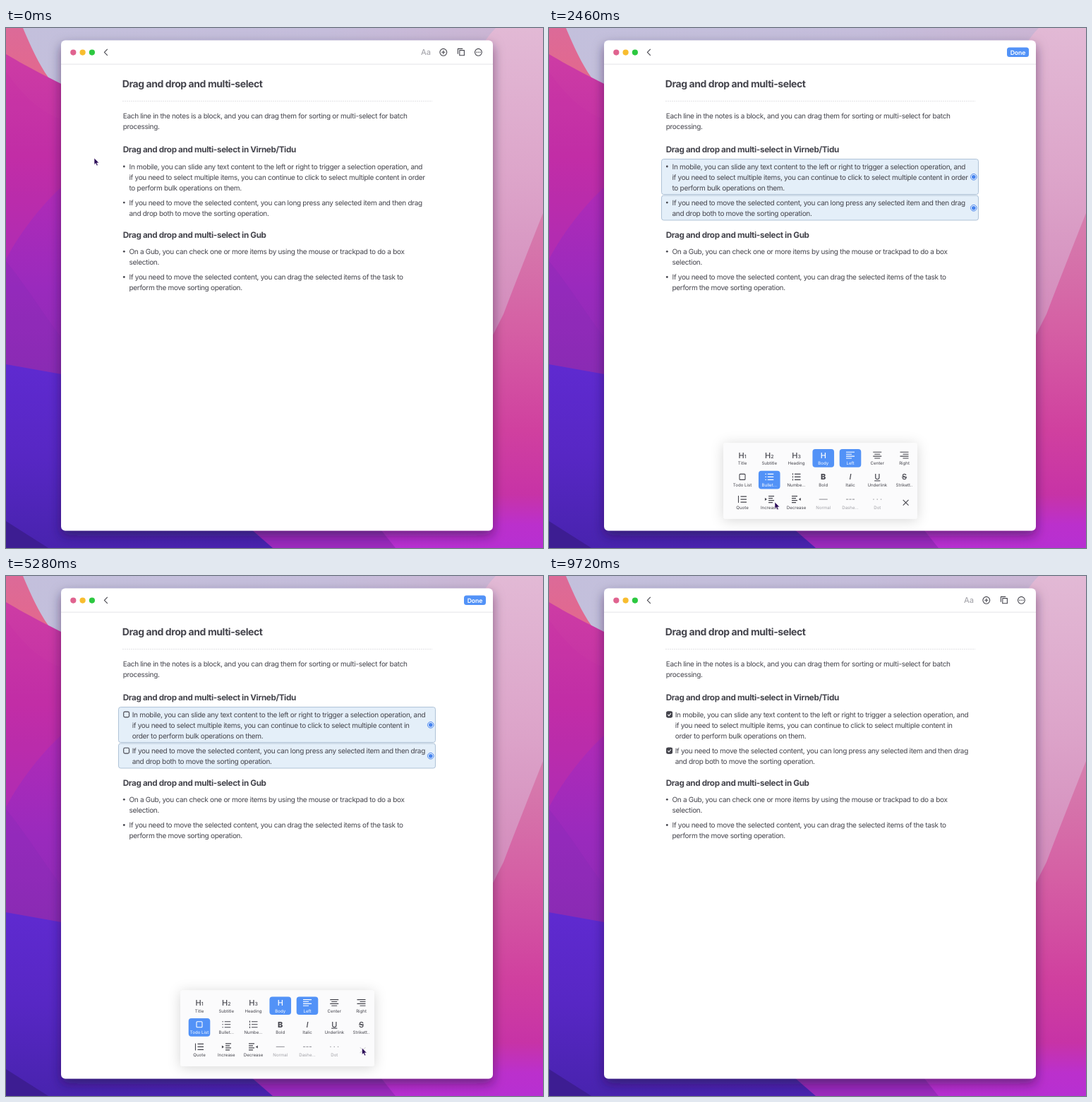
Animation of 761x736 px, one loop 9780 ms. Source, as an HTML page:

```html
<!DOCTYPE html>
<html lang="en">
<head>
<meta charset="utf-8">
<title>Drag and drop and multi-select</title>
<style>
  html, body { margin: 0; width: 100%; height: 100%; overflow: hidden; }
  svg { display: block; width: 761px; height: 736px; font-family: Inter, sans-serif; text-rendering: geometricPrecision; }
  .ink { color: #45454d; }
  .body { font-size: 10px; letter-spacing: -.03em; }
  .head { font-size: 11.7px; font-weight: 700; letter-spacing: -.03em; }
  .title { font-size: 14px; font-weight: 700; letter-spacing: -.03em; }
  .label { font-size: 6.1px; text-anchor: middle; }
  .icon { font-size: 11px; font-weight: 500; text-anchor: middle; }
  text { fill: currentColor; }
  .line { fill: none; stroke: currentColor; stroke-width: 1.1; stroke-linejoin: round; }
  .tool rect { fill: none; }
  .tool.on { color: #fff; }
  .tool.on rect { fill: #5292f7; }
</style>
</head>
<body>
<svg id="stage" viewBox="0 0 761 736"></svg>
<script>
const LOOP = 9780, BLUE = '#5292f7';

const text = (x, y, s, cls) => `<text x="${x}" y="${y}" class="${cls}">${s}</text>`;
const line = (d, extra = '') => `<path class="line" d="${d}" ${extra}/>`;
const shape = (d, fill) => `<path d="${d}" fill="${fill}"/>`;
const circle = (x, y, r, attrs) => `<circle cx="${x}" cy="${y}" r="${r}" ${attrs}/>`;
const group = (id, content) => `<g id="${id}">${content}</g>`;
const rows = (x, y, lines) => lines.map((s, i) => text(x, y + i * 15.2, s, 'body')).join('');
const bullet = (y, lines) => circle(167.3, y - 3.5, 1.4, 'fill="currentColor"') + rows(174.5, y, lines);
const fade = (id, stops, dir = 'x2="0" y2="1"') => `<linearGradient id="${id}" ${dir}>` +
  stops.map(([at, c]) => `<stop offset="${at}" stop-color="${c}"/>`).join('') + '</linearGradient>';
const shadow = (id, dy, blur, color, alpha) =>
  `<filter id="${id}" x="-30%" y="-60%" width="160%" height="240%">
   <feDropShadow dx="0" dy="${dy}" stdDeviation="${blur}" flood-color="${color}" flood-opacity="${alpha}"/></filter>`;

const defs = `<defs>
  ${fade('sky', [[0, '#c3c0dc'], [.6, '#c5bddb'], [1, '#cdb3d2']], '')}
  ${fade('coral', [[0, '#dc6a98'], [1, '#e5688a']])}
  ${fade('magenta', [[0, '#cd3ca4'], [.45, '#c22fa6'], [1, '#a92cb8']])}
  ${fade('purple', [[0, '#b12bb6'], [.5, '#9a2abd'], [1, '#8a2bb2']])}
  ${fade('indigo', [[0, '#5f2ad0'], [.5, '#5727c4'], [1, '#4823ae']])}
  ${fade('blush', [[0, '#e2b9d5'], [.4, '#dda5ca'], [1, '#cf7fb5']])}
  ${fade('rose', [[0, '#d67fae'], [.35, '#d55fa4'], [.65, '#d0409f'], [.84, '#c733a6'], [.93, '#bb30cc'], [1, '#b72fd2']])}
  ${shadow('windowShadow', 7, 8, '#1c0838', .5)}
  ${shadow('panelShadow', 2, 9, '#000', .16)}
  <clipPath id="windowClip"><rect x="78" y="17.5" width="612" height="694" rx="6"/></clipPath>
</defs>`;

const wallpaper =
  '<rect width="761" height="736" fill="url(#sky)"/>' +
  shape('M0 0H24C36 28 46 50 60 70L90 95H0Z', 'url(#coral)') +
  shape('M0 37C25 52 52 66 90 85V360H0Z', 'url(#magenta)') +
  shape('M0 62C22 92 45 120 90 134V360H0Z', '#b826a61f') +
  shape('M90 215C60 240 25 280 0 327V520H90Z', 'url(#purple)') +
  shape('M0 330C25 360 50 400 90 455V520H0Z', '#7d2ab038') +
  shape('M0 476L90 492L400 690V736H0Z', 'url(#indigo)') +
  shape('M0 698L60 736H0Z', '#3d1d92') +
  shape('M325 690L378 736H600V690Z', '#9b2abd') +
  shape('M694 0C686 8 680 16 672 30V520H761V0Z', 'url(#blush)') +
  shape('M761 262C742 310 722 360 705 405L672 470V690H515L552 736H761Z', 'url(#rose)');

const frame = `<rect x="78" y="17.5" width="612" height="694" rx="6" fill="#fff" filter="url(#windowShadow)"/>` +
  ['#e0638f', '#f8bd2f', '#2cc840'].map((c, i) => circle(95.3 + i * 13.3, 34.6, 4.1, `fill="${c}"`)).join('') +
  line('M143.8 29.8L139.4 34.3L143.8 38.8') + '<path d="M78 51.2H690" stroke="#e5e5e8"/>';

const header = group('header',
  '<g color="#a9a9af">' + text(595, 38, 'Aa', 'icon') + '</g>' +
  circle(619.8, 34.3, 4.9, 'class="line"') + line('M617.2 34.3h5.2M619.8 31.7v5.2') +
  line('M642.8 31.6h6.6v7.2h-6.6ZM640.4 36.8v-7.4h6.8') +
  circle(669.4, 34.3, 4.9, 'class="line"') +
  [-2.4, 0, 2.4].map(d => circle(669.4 + d, 34.3, .8, 'fill="currentColor"')).join(''));

const done = group('done', `<rect x="649" y="27.5" width="31" height="13.6" rx="3.5" fill="${BLUE}"/>
  <text x="664.5" y="37.5" text-anchor="middle" font-size="8.7" font-weight="600" letter-spacing="-.1" style="fill:#fff">Done</text>`);

const selection = (id, y, h) => group(id,
  `<rect x="159.5" y="${y}" width="449" height="${h}" rx="3" fill="#e4eff9" stroke="#a8bdd3" stroke-width=".9"/>` +
  circle(601.8, y + h / 2 + .2, 4.3, 'fill="#f4f9ff" stroke="#4583ee"') + circle(601.8, y + h / 2 + .2, 2.8, 'fill="#4583ee"'));

const checkbox = (id, y) => `<rect x="166.7" y="${y - 7.7}" width="7.8" height="7.8" rx="1.9" class="line"/>` +
  group(id, `<rect x="166.2" y="${y - 8.2}" width="8.8" height="8.8" rx="2.2" fill="currentColor"/>` +
  line(`M168.4 ${y - 3.7}l1.6 1.7 2.9-3.5`, 'style="stroke:#fff"'));

const mobile = 'In mobile, you can slide any text content to the left or right to trigger a selection operation, and';
const press = 'If you need to move the selected content, you can long press any selected item and then drag';
const drop = 'and drop both to move the sorting operation.';
const page =
  text(164.7, 83.8, 'Drag and drop and multi-select', 'title') +
  '<path d="M165 103.5H604" stroke="#dcdce0" stroke-width=".8" stroke-dasharray="2 1"/>' +
  rows(165.7, 127.7, ['Each line in the notes is a block, and you can drag them for sorting or multi-select for batch', 'processing.']) +
  text(165.7, 176, 'Drag and drop and multi-select in Virneb/Tidu', 'head') +
  group('bullets',
    bullet(199.5, [mobile, 'if you need to select multiple items, you can continue to click to select multiple content in order', 'to perform bulk operations on them.']) +
    bullet(250.6, [press, drop])) +
  group('todos',
    checkbox('check1', 199.8) + checkbox('check2', 251) +
    rows(178.7, 199.5, [mobile, 'if you need to select multiple items, you can continue to click to select multiple content in', 'order to perform bulk operations on them.']) +
    rows(178.7, 250.6, [press, drop])) +
  text(165.7, 296.6, 'Drag and drop and multi-select in Gub', 'head') +
  bullet(319.8, ['On a Gub, you can check one or more items by using the mouse or trackpad to do a box', 'selection.']) +
  bullet(356, ['If you need to move the selected content, you can drag the selected items of the task to', 'perform the move sorting operation.']);

const handle = group('handle', [0, 1, 2, 3].map(i =>
  [151.3, 155].map(x => circle(x, 243 + i * 2.8, .75, 'fill="#9a9aa2"')).join('')).join(''));

const card = (x, y, w, h) => `<rect x="${x}" y="${y}" width="${w}" height="${h}" rx="4" fill="#fbfbfc" filter="url(#panelShadow)"/>`;
const icon = s => `<text y="3.9" class="icon">${s}</text>`;
const heading = n => icon(`H<tspan font-size="7">${n}</tspan>`);
const tool = (name, x, y, art, label, color = '') =>
  `<g id="${name}" class="tool" transform="translate(${x} ${y})" ${color && `color="${color}"`}>
   <rect x="-15.3" y="-8.6" width="30.6" height="25.6" rx="4"/>${art}${text(0, 13.7, label, 'label')}</g>`;

const scissors = circle(-4, -2.6, 1.8, 'class="line"') + circle(-4, 2.6, 1.8, 'class="line"') + line('M-2.5-1.7L6 3M-2.5 1.7L6-3');
const toolbar = group('toolbar', card(292.5, 658, 183.5, 37.5) +
  tool('style', 322, 672, icon('Aa'), 'Style') +
  tool('copy', 363.5, 672, line('M-2-5.5h4l3 3v5.5h-7ZM-2-3h-3v8.5h7v-2.5M2-5.5v3h3'), 'Copy') +
  tool('cut', 403, 672, scissors, 'Cut') +
  tool('delete', 444.5, 672, line('M-5-3.5h10M-2-3.5v-2h4v2M-4-3.5l.5 9h7l.5-9M-1.4-1v4.5M1.4-1v4.5'), 'Delete', '#d5608f'));

const list = 'M-2.5-4h8.5M-2.5 0h8.5M-2.5 4h8.5';
const align = x => line(`M-6-4.4h12M${x}-1.5h8M-6 1.4h12M${x} 4.3h8`);
const indent = (x, arrow) => line(`M${x}-4.5h8M${x}-1.5h6M${x} 1.5h8M${x} 4.5h6`) + shape(arrow, 'currentColor');
const grid = [
  [['h1', heading(1), 'Title'], ['h2', heading(2), 'Subtitle'], ['h3', heading(3), 'Heading'], ['plain', icon('H'), 'Body'],
   ['left', align(-6), 'Left'], ['center', align(-4), 'Center'], ['right', align(-2), 'Right']],
  [['todo', '<path class="line" d="M-3-4h6q1 0 1 1v6q0 1-1 1h-6q-1 0-1-1v-6q0-1 1-1Z"/>', 'Todo List'],
   ['dots', line(list + 'M-5.8-4h1.4M-5.8 0h1.4M-5.8 4h1.4'), 'Bullet...'],
   ['numbers', line(list + 'M-5-5.2v2.4M-5-1.2v2.4M-5 2.8v2.4'), 'Numbe...'],
   ['bold', icon('<tspan font-weight="800">B</tspan>'), 'Bold'], ['italic', icon('<tspan font-style="italic">I</tspan>'), 'Italic'],
   ['under', icon('<tspan text-decoration="underline">U</tspan>'), 'Underlink'],
   ['strike', icon('<tspan text-decoration="line-through">S</tspan>'), 'Strikett..']],
  [['quote', line(list + 'M-5.5-5v10'), 'Quote'], ['more', indent(-1.2, 'M-6.3-2l3 2-3 2Z'), 'Increase'],
   ['less', indent(-6.5, 'M6.3-2l-3 2 3 2Z'), 'Decrease'],
   ['normal', line('M-6 0h12'), 'Normal', '#a2a2a8'], ['dash', line('M-6 0h3.2M-1.6 0h3.2M2.8 0h3.2'), 'Dashe...', '#a2a2a8'],
   ['dotted', line('M-6 0h1.4M-.7 0h1.4M4.6 0h1.4'), 'Dot', '#a2a2a8']]
];
const panel = group('panel', card(247, 586.5, 275, 107.5) +
  grid.map((r, j) => r.map(([name, ...rest], i) => tool(name, 274 + i * 38.25, [604, 634.7, 666.4][j], ...rest)).join('')).join('') +
  group('close', line('M501.7 667.2l7.8 7.8M509.5 667.2l-7.8 7.8')));

document.getElementById('stage').innerHTML = defs + wallpaper + `<g class="ink">${frame}${header}${done}` +
  selection('select1', 185.6, 50) + selection('select2', 237, 35) + page + handle +
  '<rect id="marquee" x="128.5" y="194" fill="#78b0e638" stroke="#8fb0ea" stroke-width=".9"/>' +
  `<g clip-path="url(#windowClip)">${toolbar}${panel}</g></g>` +
  '<path id="cursor" d="M0 0v9.4l2.1-1.9 1.5 3.4 1.7-.7-1.5-3.3h3Z" fill="#2b0b57" stroke="#fff" stroke-width=".6"/>';

const el = {};
document.querySelectorAll('#stage [id]').forEach(e => el[e.id] = e);
el.plain.classList.add('on');
el.left.classList.add('on');

// Cursor stops: time, x, y
const path = [
  [0, 125, 184], [300, 128.5, 194], [420, 128.5, 194], [900, 185.5, 247.5], [1100, 185.5, 247.5],
  [1850, 320, 671], [2700, 320, 671], [3300, 270.5, 636], [3700, 270.5, 636], [4900, 504.5, 668], [5420, 504.5, 668],
  [6200, 664, 35], [6420, 664, 35], [6950, 171, 194], [7120, 171, 194], [7380, 171, 244.5], [7680, 171, 244.5], [8500, -12, 300]
];
const clamp = u => Math.max(0, Math.min(1, u));
const easeOut = u => 1 - (1 - clamp(u)) ** 3;
const between = (t, a, b) => t >= a && t < b;
const shown = (t, from, to, span) => easeOut((t - from) / span) - easeOut((t - to) / span);
const show = (id, on) => el[id].style.display = on ? '' : 'none';
const dim = (id, on) => el[id].style.opacity = on ? .2 : 1;

function cursorAt(t) {
  const i = path.findIndex(p => p[0] > t);
  if (i < 0) return path[path.length - 1].slice(1);
  const [t0, x0, y0] = path[i - 1], [t1, x1, y1] = path[i];
  const u = (t - t0) / (t1 - t0), k = u * u * (3 - 2 * u);
  return [x0 + (x1 - x0) * k, y0 + (y1 - y0) * k];
}

function slide(id, amount, travel) {
  show(id, amount > .002);
  el[id].setAttribute('transform', `translate(0 ${travel * (1 - amount)})`);
}

function render(t) {
  const [x, y] = cursorAt(t);
  const selecting = between(t, 670, 6330), todo = t >= 3560;
  el.cursor.setAttribute('transform', `translate(${x} ${y})`);
  show('marquee', between(t, 420, 1080));
  el.marquee.setAttribute('width', Math.max(0, x - 128.5));
  el.marquee.setAttribute('height', Math.max(0, y - 194));
  show('header', !selecting);
  show('done', selecting);
  show('select1', selecting);
  show('select2', between(t, 760, 6330));
  show('bullets', !todo);
  show('todos', todo);
  show('check1', t >= 7080);
  show('check2', t >= 7560);
  show('handle', between(t, 6900, 7860));
  el.handle.setAttribute('transform', `translate(0 ${t < 7260 ? -51 : 0})`);
  el.dots.classList.toggle('on', !todo);
  el.todo.classList.toggle('on', todo);
  dim('style', between(t, 1890, 2100));
  dim('todo', between(t, 3360, 3560));
  dim('close', between(t, 5220, 5420));
  slide('toolbar', shown(t, 670, 1950, 250) + shown(t, 5600, 6330, 250), 75);
  slide('panel', shown(t, 2130, 5420, 400), 140);
}

function tick() {
  render(performance.now() % LOOP);
  requestAnimationFrame(tick);
}
tick();
</script>
</body>
</html>
```
